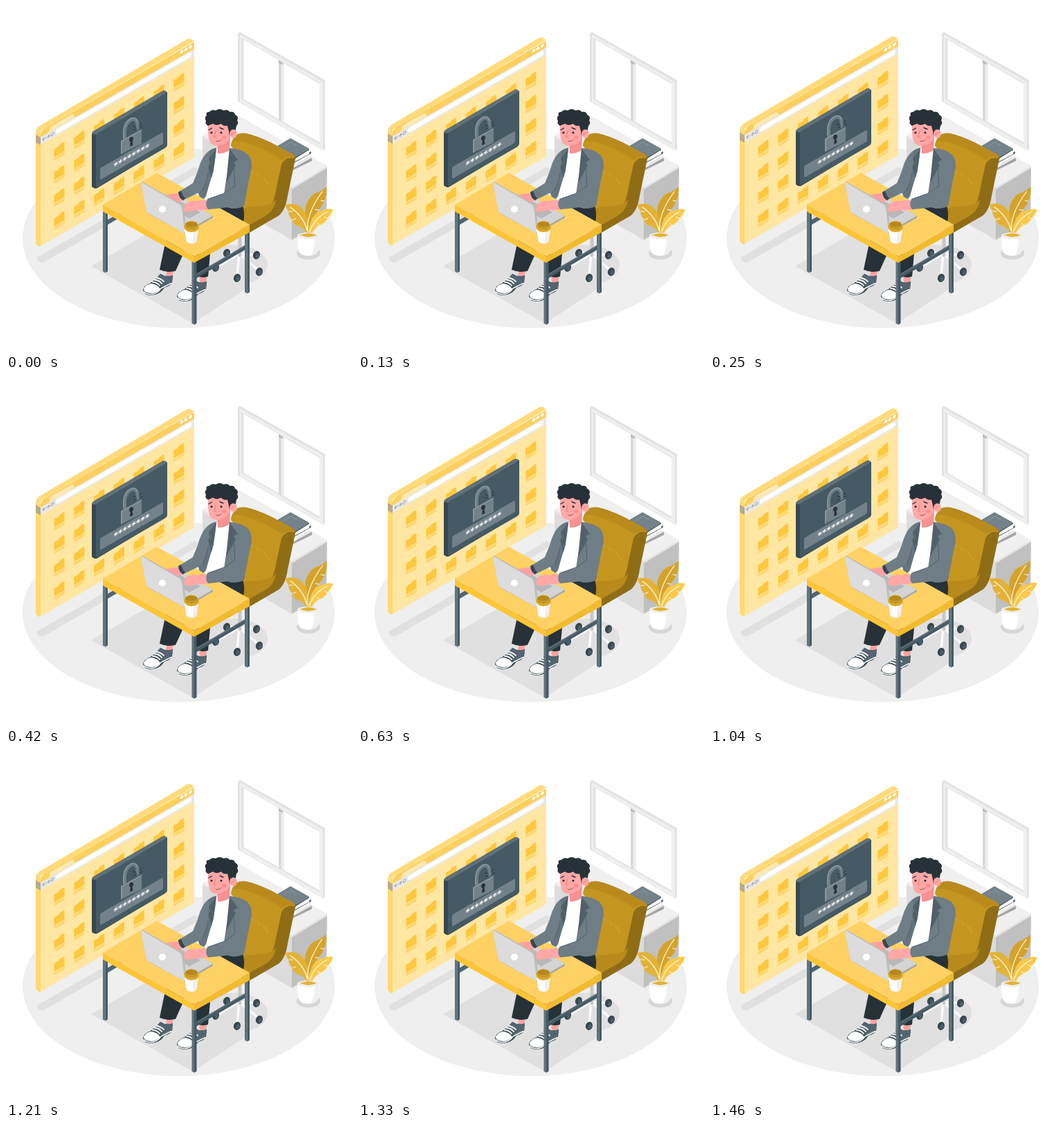
Write an HTML page that moves like this. It is 500x500 px and loops after 1500 ms.

```html
<!DOCTYPE html>
<html lang="en">
<head>
<meta charset="utf-8">
<title>Locked files</title>
<style>
  html, body { margin: 0; width: 100%; height: 100%; overflow: hidden; background: #fff; }
  svg { display: block; width: 100vw; height: 100vh; }
  #leaves { transform-origin: 438.5px 298px; }
  .line { fill: none; stroke-linecap: round; stroke-linejoin: round; }
  .stars { font: bold 12.4px "DejaVu Sans", sans-serif; fill: #fff; text-anchor: middle; }
</style>
</head>
<body>
<svg viewBox="0 0 500 500">
  <defs>
    <g id="folder">
      <path d="M-7.5-7.5H-1L1-9.500H6.500Q7.500-9.500 7.500-8V4H-7.500Z" fill="#fdc83e"/>
      <path d="M-7.500 6H7.500M-7.500 8.300H7.500" stroke="#fdc83e" stroke-width="1.100"/>
    </g>
    <g id="wheel">
      <ellipse rx="5" ry="6" fill="#37474f" transform="rotate(20)"/>
      <ellipse cx="1.500" cy=".5" rx="2.500" ry="3.500" fill="#4c5e68" transform="rotate(20)"/>
    </g>
    <g id="shoe">
      <path d="M0 20Q1 14 11 10L19 4 25-3Q34 3 43-1L42 10Q39 15 31 17 24 28 11 28 0 27 0 20Z" fill="#37474f"/>
      <path d="M19 4 25-3Q34 3 43-1L42 8Q34 14 27 17Z" fill="#526570"/>
      <path d="M1 18Q5 12 12 11 21 12 25 19 20 25 11 25 0 24 1 18Z" fill="#fff"/>
      <path class="line" d="M1 23Q6 27 13 26.500 22 25 26 18L41 10.500" stroke="#fff" stroke-width="1.500"/>
      <path class="line" d="M14 9Q20 9 24 14M17 6Q23 6 27 11M20 3Q25 3.500 30 8" stroke="#fff" stroke-width="1.800"/>
    </g>
  </defs>

  <!-- floor and shadows -->
  <ellipse cx="249.500" cy="335.500" rx="225.500" ry="130" fill="#efefef"/>
  <g fill="#e0e0e0">
    <path d="M47 362 272 233 283 238 57 369Q50 373 46 368 43 364 47 362Z"/>
    <path d="M123 376 218 321 352 405 270 459Z"/>
    <ellipse cx="330" cy="374" rx="48" ry="29"/>
    <ellipse cx="437" cy="357" rx="17" ry="9.500" fill="#d6d6d6"/>
  </g>

  <!-- room window -->
  <path d="M335 39.500 338 37.500 461 107V207L458 209 335 138Z" fill="#e3e3e3"/>
  <path d="M338 41 458 109.500V209L338 139Z" fill="#efefef"/>
  <path d="M340 46 453 111V200L340 134.500Z" fill="#e3e3e3"/>
  <path d="M343.500 49 394 78V163.500L343.500 134.500ZM402 83 453 112.500V197L402 168Z" fill="#fff"/>
  <path d="M394 78 398 80V166L394 164Z" fill="#dadada"/>
  <path d="M398 81 402 83V168L398 166Z" fill="#efefef"/>
  <path d="M394 79 400 82.500V85L394 82Z" fill="#b5b5b5"/>

  <!-- cabinet and books -->
  <path d="M284 188 413 262V338L284 264Z" fill="#dcdcdc"/>
  <path d="M413 262 464 232 463 309 413 338Z" fill="#c0c0c0"/>
  <path d="M284 187 335 158 464 231 413 262Z" fill="#f0f0f0"/>
  <path d="M284 187 413 262 464 231V234L413 265 284 191Z" fill="#e4e4e4"/>
  <path d="M389 221 415 234 442 219V224L415 237Z" fill="#a5a5a5"/>
  <path d="M396 215 416 225 441 212V219L415 233 393 222Z" fill="#fff"/>
  <path d="M396 212 416 223 441 210V213L416 227 395 216Z" fill="#607079"/>
  <path class="line" d="M420 229 440 218" stroke="#c9c9c9"/>
  <path d="M391 204 418 219 438 207V214L417 225 392 211Z" fill="#f8f8f8"/>
  <path d="M391 203 411 191 438 206 418 218Z" fill="#74828a"/>
  <path d="M391 203 418 218 438 206V208L418 220.500 393 207V210L417 223V226L391 211Z" fill="#52636c"/>
  <path class="line" d="M401 203 411 197 421 202" stroke="#8f9ba1"/>

  <!-- plant -->
  <g id="leaves">
    <path d="M435 330Q430 306 433 290 437 276 446 271 455 268 463 261 464 272 460 281 457 289 452 294 446 301 442 309 439 318 438 330Z" fill="#d5a32a"/>
    <path d="M435 331Q431 320 422 318 415 316 413 308 408 303 408 296 405 293 404 287 416 284 424 289 432 295 435 306 439 318 438 331Z" fill="#e3b235"/>
    <path d="M436 331Q438 316 443 306 449 297 458 295 466 292 473 294 470 301 465 306 462 313 455 316 446 319 441 331Z" fill="#fac846"/>
    <g class="line" stroke="#fff" stroke-width="1.200">
      <path d="M436 326Q433 302 457 268M439 326Q444 308 465 297M435 324Q430 304 411 291"/>
      <path d="M460 282 455 281M452 295 447 294M409 297 414 297M414 309 419 307M465 307 460 305M454 317 450 314" stroke-width="1"/>
    </g>
  </g>
  <path d="M421 332Q421 328 437 328T453 332L452 352Q449 361 437 361T422 352Z" fill="#fff"/>
  <path d="M446 331 453 330 452 352Q449 360 439 361 447 354 446 331Z" fill="#f0f0f0"/>
  <ellipse cx="437" cy="332" rx="15.500" ry="4.500" fill="#ededed"/>
  <path d="M425 331Q437 326 449 331 437 337 425 331Z" fill="#e3b235"/>

  <!-- browser -->
  <g id="browser">
    <path d="M43 183Q43 177 49 173L258 50Q264 45.500 268 48L272 51 50 180V347Q48 349 43 343Z" fill="#ffdb7c"/>
    <path d="M43 183 50 187V347Q48 349 43 343Z" fill="#ffd970"/>
    <path d="M43 186 50 190V201L43 197Z" fill="#b9ac86"/>
    <g transform="matrix(1 -.577 0 1 50 180)">
      <path d="M0 7Q0 1 6 0H218Q222-1 222 4V20H0Z" fill="#fdcf5c"/>
      <path d="M0 20.500H222V167H0Z" fill="#ffe6a2"/>
      <path d="M0 9.500H222V20.500H0Z" fill="#e8e8e8"/>
      <path d="M9 9.500Q13 9 13 6 13 2.500 17 2.500H44Q48 2.500 48 6 48 9.500 52 9.500Z" fill="#ffe9b3"/>
      <rect x="22" y="11.500" width="196" height="7" rx="3" fill="#fff"/>
      <g fill="#fff">
        <circle cx="204" cy="3.900" r="2.300"/><circle cx="210" cy="3.900" r="2.300"/><circle cx="216.500" cy="3.900" r="2.300"/>
      </g>
      <g class="line" stroke="#a3a3a3">
        <path d="M5 13 3 15 5 17M3 15H7M11 13 13 15 11 17M9 15H13"/>
        <circle cx="17" cy="15" r="2"/>
      </g>
      <g id="folders"></g>
    </g>

    <path d="M124 187Q124 182 128 180L226 123Q230 121 233 125L232 203 132 263Q128 265 124 261Z" fill="#37474f"/>
    <path d="M124 184Q124 182 128 180L226 123Q230 121 233 125L130 186Z" fill="#607079"/>
    <g transform="matrix(1 -.577 0 1 130 185)">
      <path d="M0 4Q0 0 4 0H100Q103 0 103 3V75Q103 78 99 78H3Q0 78 0 75Z" fill="#455a64"/>
      <rect x="6" y="53" width="91" height="17" rx="2" fill="#72818a"/>
      <text class="stars" x="51.500" y="66.200">********</text>
    </g>
    <path class="line" d="M171.500 191V181Q172 169 181 164 191 161 190 177" stroke="#6f7e86" stroke-width="5"/>
    <path class="line" d="M170 190V180Q171 168 180 163 187 160 190 167" stroke="#8b989e" stroke-width="1.500"/>
    <path d="M166 195 196 178V199L166 214Z" fill="#72818a"/>
    <path d="M166 195 196 178V180L168 196V213L166 214Z" fill="#87949a"/>
    <path d="M178 194Q178 190 181 189 184 189 184 192 184 194 182.500 195L183.500 201 179 203 180 196Q178 196 178 194Z" fill="#263238"/>
    <path class="line" d="M184 174 188 175M185 179 189 177.500M193 172 196 169.500M194 175 197 174" stroke="#263238"/>
  </g>

  <!-- chair -->
  <path class="line" d="M337 358 334 390M337 358 365 382M337 358 360 360M337 358 321 356M337 358 305 377" stroke="#fafafa" stroke-width="3.500"/>
  <path class="line" d="M338 320V360" stroke="#c8c8c8" stroke-width="5"/>
  <use href="#wheel" x="319" y="357"/><use href="#wheel" x="303" y="378"/>
  <use href="#wheel" x="362" y="360"/><use href="#wheel" x="366" y="384"/><use href="#wheel" x="334" y="393"/>
  <path d="M326 197Q331 182 346 184 361 187 384 198L412 213Q420 217 418 222L407 274Q404 295 394 303L351 328 325 314Z" fill="#8f6d16"/>
  <path d="M325 200Q331 182 346 184 361 187 384 198L412 213Q418 216 417 220 403 217 398 229L388 276Q385 290 373 293L343 299Z" fill="#c5961f"/>
  <path d="M329 195Q333 184 346 184 361 187 384 198L412 213Q418 216 417 220 405 216 399 223 376 207 355 200 340 194 329 195Z" fill="#b88b1c"/>
  <path d="M335 292 361 290Q382 289 390 280 388 297 372 305L347 319 325 309Z" fill="#b88a1c"/>
  <path class="line" d="M354 238 358 241M363 243 367 246M372 249 376 252M376 254 379 258" stroke="#d3ab43"/>

  <!-- legs -->
  <path d="M233 379 242 383 239 395 231 389ZM279 388 290 390 289 402 280 398Z" fill="#ffa0a0"/>
  <use href="#shoe" x="198" y="390"/>
  <use href="#shoe" x="247" y="399"/>
  <path d="M231 338 259 352 245 383Q232 386 222 381Z" fill="#263238"/>
  <path d="M268 358H295L292 391Q282 394 273 389Z" fill="#263238"/>
  <path d="M298 292 341 286Q347 300 342 315L315 312 284 290Z" fill="#263238"/>

  <!-- torso -->
  <path d="M304 206 325 203 338 214 326 290 288 283 289 262Z" fill="#fff"/>
  <path d="M304 205Q296 206 291 212 283 223 274 258L282 283 289 275Q295 253 300 238Z" fill="#65757d"/>
  <path d="M323 205Q341 207 349 214 355 220 355 231L344 289Q329 297 313 288 317 254 322 232Z" fill="#6f7e86"/>
  <path d="M304 206 293 221 296 227 292 230 297 249 302 223Z" fill="#506169"/>
  <path d="M323 206 335 222 329 226 332 230 318 256 321 226Z" fill="#506169"/>
  <path d="M305 194 324 186 323 208Q316 214 306 213Z" fill="#f99090"/>

  <!-- head -->
  <path d="M292 168Q291 185 294 195 297 203 307 202 318 200 322 192L326 182V166L317 158 298 160Z" fill="#ffa8a7"/>
  <path d="M292 173Q287 171 289 166 286 161 290 158 288 153 294 153 297 149 303 151 309 147 314 151 321 149 323 153 330 152 331 157 337 160 334 165 337 170 333 173L331 184 323 187 322 181 320 173Q314 174 311 170 304 174 299 170Z" fill="#263238"/>
  <ellipse cx="328.500" cy="184.500" rx="5.300" ry="6.300" fill="#ffa8a7"/>
  <path class="line" d="M326 187Q327 182 331 183" stroke="#e77d80"/>
  <g fill="#263238"><circle cx="297" cy="183" r="1.600"/><circle cx="311" cy="183" r="1.600"/></g>
  <path class="line" d="M293 179 297.500 176.500M309 176 314 178" stroke="#263238" stroke-width="1.400"/>
  <path class="line" d="M303 181 300.500 189 303.500 189.500" stroke="#e5787b"/>
  <path class="line" d="M304 195.500Q308 197 311 193.500" stroke="#a44a50"/>
  <ellipse cx="315" cy="190" rx="3.500" ry="2.500" fill="#ff8f92"/>

  <!-- desk -->
  <path d="M147 309 167 297V304L147 316Z" fill="#526570"/>
  <path d="M275 387 345 346V352.500L275 393.500Z" fill="#455a64"/>
  <path d="M275 387 345 346V348L275 389Z" fill="#607179"/>
  <g id="posts"></g>
  <path d="M140 287 272 362V371L140 297Z" fill="#fdc537"/>
  <path d="M272 362 352 316V327L272 371Z" fill="#f2bb2f"/>
  <path d="M140 287 218 241 352 316 272 362Z" fill="#fdd163"/>

  <!-- laptop and arms -->
  <path d="M206 300 250 275 299 303V306L259 329Z" fill="#a9a9a9"/>
  <path d="M206 299 250 274 299 303 259 326Z" fill="#d4d4d4"/>
  <path d="M250 281 281 298 265 307 235 289Z" fill="#b8b8b8"/>
  <path d="M255 269Q249 272 242 271L231 273Q230 276 236 277 240 283 249 284 256 281 260 275Z" fill="#ffa0a0"/>
  <path d="M294 209Q283 216 277 239L270 256 249 269Q250 278 257 280L282 268Q289 259 292 240Z" fill="#6f7e86"/>
  <path class="line" d="M284 266Q289 258 292 242" stroke="#506169"/>
  <path d="M249 269 253 267Q255 274 259 278L256 281Q250 278 249 269Z" fill="#37474f"/>
  <path d="M293 282Q283 279 276 282 267 280 260 285 256 287 259 289 255 293 258 296 264 299 271 296L292 294Z" fill="#ffa8a7"/>
  <path d="M335 219Q347 208 354 222 357 236 349 255L341 281Q334 290 320 291L292 294Q287 287 291 279L318 270 330 260Z" fill="#6f7e86"/>
  <path class="line" d="M329 234 331 260 317 270 292 279" stroke="#506169"/>
  <path d="M195 256Q196 253 199 255L253 286Q257 288 257 291L261 327Q260 330 256 327L207 300Q203 298 202 294Z" fill="#bcbcbc"/>
  <path d="M195 256Q195 254 198 256L251 287Q254 289 254 292L258 326Q258 329 255 327L207 300Q203 298 202 294Z" fill="#dcdcdc"/>
  <circle cx="226" cy="293.500" r="5" fill="#fff"/>

  <!-- cup -->
  <path d="M257.500 322H278L275 341Q268 346 261 341Z" fill="#fff"/>
  <path d="M272 325 278 323 275 341Q272 344 269 344Z" fill="#f0f0f0"/>
  <path d="M257 319Q257 317 259 316L260 313Q268 308 276 313L277 316Q279 317 279 320 278 326 268 327 258 326 257 319Z" fill="#dba92c"/>
  <path d="M259 316Q268 324 277 316L276 321Q268 325 260 321Z" fill="#c5961f"/>
  <ellipse cx="268" cy="315.500" rx="8.500" ry="3.800" fill="#b5861a"/>
</svg>
<script>
  const NS = 'http://www.w3.org/2000/svg';
  const $ = id => document.getElementById(id);
  const add = (parent, tag, attrs) => {
    const el = document.createElementNS(NS, tag);
    for (const key in attrs) el.setAttribute(key, attrs[key]);
    return parent.appendChild(el);
  };

  for (let col = 0; col < 7; col++)
    for (let row = 0; row < 4; row++)
      add($('folders'), 'use', { href: '#folder', x: 27 + 28.8 * col, y: 45.5 + 33.3 * row });

  // Desk legs: a lit left side and a dark right side
  for (const [x, top, bottom] of [[140, 294, 384], [268.5, 366, 459], [345, 322, 414]]) {
    add($('posts'), 'path', { d: `M${x} ${top}h3.5V${bottom + 1.5}l-3.5-2z`, fill: '#607179' });
    add($('posts'), 'path', { d: `M${x + 3.5} ${top}h3.5V${bottom - 0.5}l-3.5 2z`, fill: '#455a64' });
  }

  const loop = (id, steps) => $(id).animate(
    steps.map(([offset, transform]) => ({ offset, transform })),
    { duration: 1500, iterations: Infinity, easing: 'linear' }
  );
  loop('browser', [[0, 'translateY(0px)'], [0.5, 'translateY(-10px)'], [1, 'translateY(0px)']]);
  loop('leaves', [[0, 'rotate(0deg)'], [0.25, 'rotate(1deg)'], [0.75, 'rotate(-1deg)'], [1, 'rotate(0deg)']]);
</script>
</body>
</html>
```
